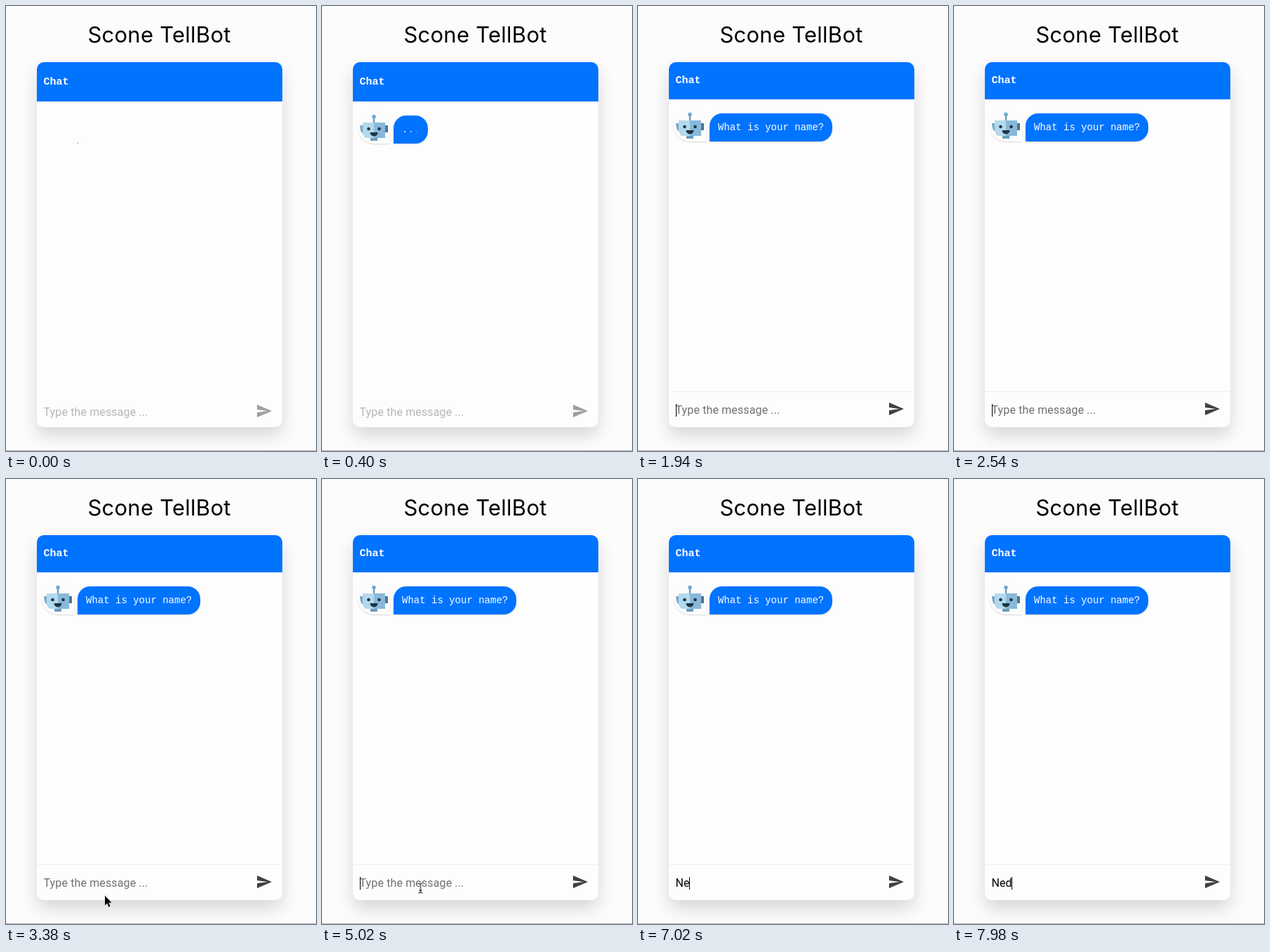
An HTML page that plays this animation: 442 px wide and 634 px high, repeating every 8000 ms.

```html
<!DOCTYPE html>
<html lang="en">
<head>
<meta charset="utf-8">
<title>Chat</title>
<style>
  html, body { margin: 0; width: 100%; height: 100%; overflow: hidden; background: #fcfcfc; }
  .stage { position: relative; width: 442px; height: 634px; overflow: hidden; background: #fcfcfc; }
  .stage::after {
    content: ""; position: absolute; left: 0; right: 0; bottom: 0; height: 1px; background: #b4b4b4;
  }
  h1 {
    position: absolute; left: 0; top: 21px; width: 437px; margin: 0; text-align: center;
    font: 400 31px/40px Inter, sans-serif; letter-spacing: .25px; color: #000;
  }
  .card {
    position: absolute; left: 44px; top: 80px; width: 350px; height: 520px;
    border-radius: 10px; background: #fdfdfd;
    box-shadow: 0 12px 24px rgba(0, 0, 0, .15);
  }
  /* every timeline shares the 8 s loop */
  .run { animation: 8s step-end infinite; }

  header {
    box-sizing: border-box; height: 53px; padding-left: 9.5px; display: flex; align-items: center;
    border-radius: 10px 10px 0 0; background: #0073ff; color: #fff;
    font: bold 15px "Liberation Mono", monospace;
  }
  header.run { animation-name: shrink; }
  .lift { animation-name: lift; }

  .log { position: absolute; left: 0; top: 0; }
  .avatar, .bubble {
    position: absolute; box-sizing: border-box; animation: pop 8s infinite;
    box-shadow: 0 1px 2px rgba(0, 0, 0, .15);
  }
  .avatar {
    left: 7px; top: 67px; width: 46px; height: 46px; padding: 3px;
    border-radius: 50% 50% 0 50%; transform-origin: 100% 100%;
  }
  .avatar svg { display: block; }
  .bubble {
    left: 58px; top: 73px; height: 40px; padding: 0 12px; border-radius: 18px 18px 18px 0;
    transform-origin: 0 100%; background: #0073ff; color: #fff; white-space: pre;
    font: 14px/41px "Liberation Mono", monospace;
  }
  .dots { animation-name: pop, before; animation-timing-function: ease, step-end; animation-duration: 8s; }
  .dots i { font-style: normal; animation: blink 8s linear infinite both; }
  .dots i:nth-child(2) { animation-delay: .2s; }
  .dots i:nth-child(3) { animation-delay: .4s; }
  .question { animation: after 8s step-end infinite; }

  footer {
    position: absolute; left: 0; right: 0; top: 469px; height: 51px;
    font: 16px/20px Roboto, sans-serif; letter-spacing: .13px;
  }
  .rule { position: absolute; left: 0; right: 0; height: 1px; background: #eee; animation-name: after; }
  .hint, .typed { position: absolute; left: 9.5px; top: 16.5px; white-space: pre; }
  .fade { animation-name: wake; }
  .hint { color: #707070; }
  .hint span { animation-name: untilTyping; }
  .typed { color: #000; letter-spacing: 0; }
  .typed b { font-weight: 400; }
  .key1 { animation-name: key1; }
  .key2 { animation-name: key2; }
  .key3 { animation-name: key3; }
  .caret {
    display: inline-block; width: 1px; height: 18px; vertical-align: -4px;
    background: #000; animation-name: caret;
  }
  .send { position: absolute; left: 312px; top: 13px; fill: #414141; }

  .pointer {
    position: absolute; left: 0; top: 0; overflow: visible;
    animation: travel 8s linear infinite;
  }
  .arrow { animation-name: arrow; }
  .beam { animation-name: beam; }

  @keyframes shrink { 0% { height: 56px } 22.5%, 100% { height: 53px } }
  @keyframes lift { 0% { transform: translateY(3px) } 22.5%, 100% { transform: none } }
  @keyframes pop {
    0% { transform: scale(.03); animation-timing-function: step-end }
    1.4% { transform: scale(.04); animation-timing-function: ease }
    5.15%, 100% { transform: none }
  }
  @keyframes before { 0% { visibility: visible } 22.5%, 100% { visibility: hidden } }
  @keyframes after { 0% { visibility: hidden } 22.5%, 100% { visibility: visible } }
  @keyframes blink {
    0%, 17.5%, 35%, 100% { opacity: .2 }
    3.5%, 21% { opacity: 1 }
  }
  @keyframes wake { 0% { opacity: .5 } 22.5%, 100% { opacity: 1 } }
  @keyframes untilTyping { 0% { opacity: 1 } 80.2%, 100% { opacity: 0 } }
  @keyframes key1 { 0% { font-size: 0 } 80.2%, 100% { font-size: 16px } }
  @keyframes key2 { 0% { font-size: 0 } 87.7%, 100% { font-size: 16px } }
  @keyframes key3 { 0% { font-size: 0 } 92.95%, 100% { font-size: 16px } }
  @keyframes caret {
    0%, 38.7%, 68% { opacity: 0 }
    23.2%, 59.2%, 76.7%, 100% { opacity: 1 }
  }
  @keyframes travel {
    0%, 38.7% { transform: translate(351px, 627px); animation-timing-function: ease-out }
    42%, 48.7% { transform: translate(141px, 593.5px) }
    52.2%, 100% { transform: translate(140.5px, 583px) }
  }
  @keyframes arrow { 0%, 51% { opacity: 0 } 38.7% { opacity: 1 } 100% { opacity: 0 } }
  @keyframes beam { 0%, 80.2% { opacity: 0 } 51% { opacity: 1 } 100% { opacity: 0 } }
</style>
</head>
<body>
<div class="stage">
  <h1>Scone TellBot</h1>

  <div class="card">
    <header class="run">Chat</header>

    <div class="run lift log">
      <div class="avatar">
        <svg width="40" height="40" viewBox="0 0 40 40">
          <path d="M19 5h2v9h-2z" fill="#5c8fb0"/>
          <circle cx="20" cy="4.5" r="2.8" fill="#6fa9cf"/>
          <path d="M0 17h5v11H3q-3-4-3-11z" fill="#7fa9c4"/>
          <path d="M36 17h4v10h-4z" fill="#4f748f"/>
          <path d="M15 35h10v4H15z" fill="#6c9dbd"/>
          <path d="M4 13h16v22H8q-4-3-4-9z" fill="#b3d9ee"/>
          <path d="M20 13h16v22H20z" fill="#88b9da"/>
          <g fill="#1f3442">
            <circle cx="12.5" cy="22" r="2.3"/>
            <circle cx="27.5" cy="22" r="2.3"/>
            <path d="M14.500 27h11a5.500 5.500 0 0 1-11 0z"/>
          </g>
        </svg>
      </div>
      <div class="bubble dots"><i>.</i><i>.</i><i>.</i></div>
      <div class="bubble question">What is your name?</div>
    </div>

    <footer class="run lift">
      <div class="run rule"></div>
      <div class="run fade hint"><span class="run">Type the message ...</span></div>
      <div class="typed"><b class="run key1">N</b><b class="run key2">e</b><b class="run key3">d</b><span class="run caret"></span></div>
      <svg class="run fade send" width="24" height="24" viewBox="0 0 24 24">
        <path d="M2 21l21-9L2 3v7l15 2-15 2z"/>
      </svg>
    </footer>
  </div>

  <svg class="pointer" width="1" height="1">
    <path class="run arrow" d="M0 0v14l3.200-3 2.300 5.200 2.200-1-2.300-4.900h4.400z" stroke="#fff" stroke-width="1" paint-order="stroke"/>
    <g class="run beam" fill="none">
      <path d="M-3-7q3 0 3 2v10q0 2-3 2M3-7q-3 0-3 2M3 7q-3 0-3-2M-2 3h4" stroke="#fff" stroke-width="2.500"/>
      <path d="M-3-7q3 0 3 2v10q0 2-3 2M3-7q-3 0-3 2M3 7q-3 0-3-2M-2 3h4" stroke="#000"/>
    </g>
  </svg>
</div>
</body>
</html>
```
